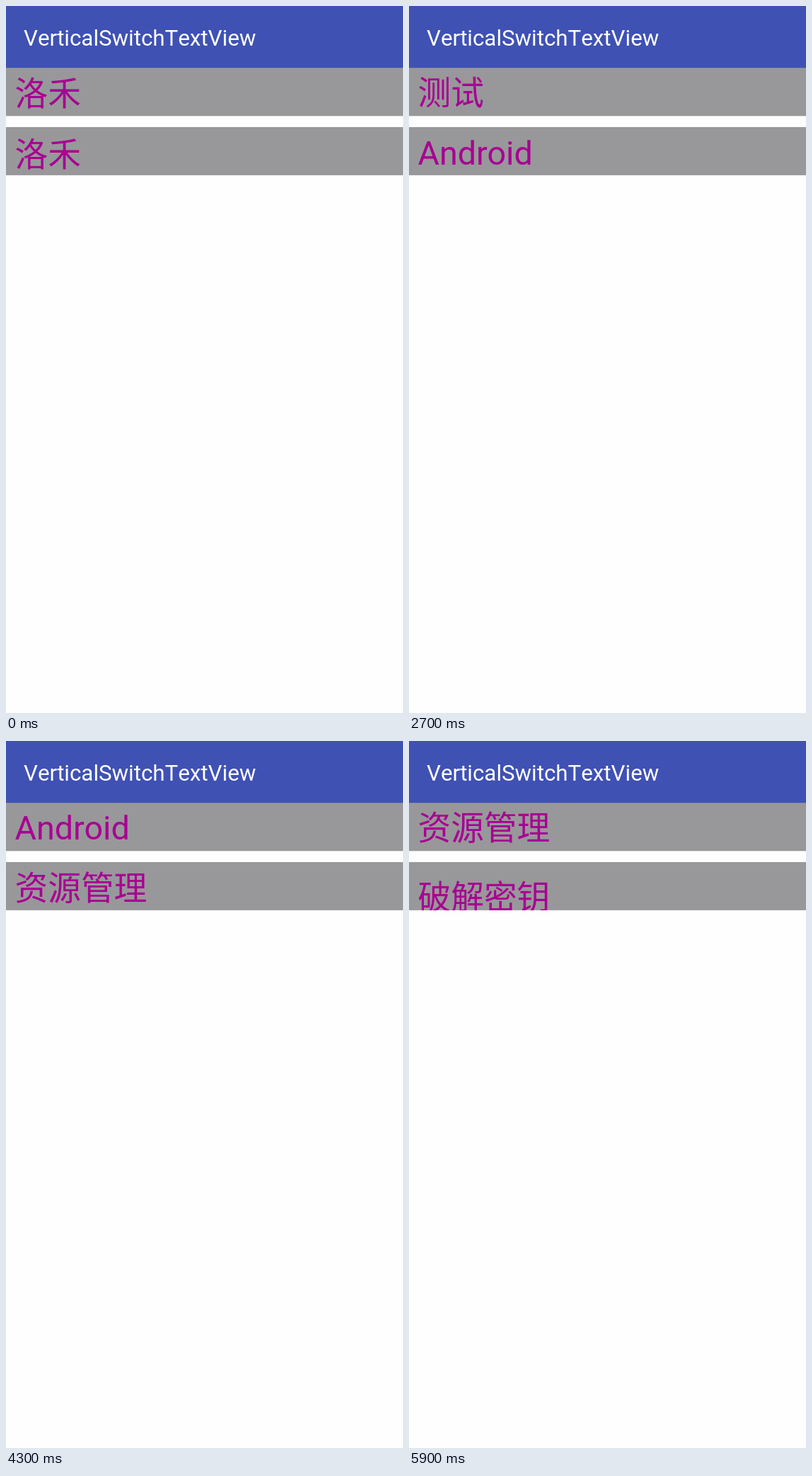
An HTML page for the animation above (6000 ms loop, 561x998 px).

```html
<!DOCTYPE html>
<html lang="zh-CN">
<head>
<meta charset="utf-8">
<title>VerticalSwitchTextView</title>
<style>
  html, body { margin: 0; width: 100%; height: 100%; overflow: hidden; background: #fefefe; }
  svg { display: block; }
  text { font-family: Roboto, "Noto Sans CJK SC", "Noto Sans CJK", sans-serif; }
  .title { font-size: 31.3px; font-kerning: none; fill: #fff; }
  .bar { fill: #98989a; }
  .row text { font-size: 46.7px; fill: #a80092; }
</style>
</head>
<body>
<svg width="561" height="998">
  <rect width="561" height="88" fill="#3f51b3"/>
  <text class="title" x="25" y="56">VerticalSwitchTextView</text>
  <rect class="bar" y="87.3" width="561" height="68"/>
  <svg class="row" y="87.3" width="561" height="68"><text x="12.5"></text></svg>
  <rect class="bar" y="170.9" width="561" height="68"/>
  <svg class="row" y="170.9" width="561" height="68"><text x="12.5"></text></svg>
</svg>
<script>
const LOOP = 6000, STEP = 100, HEIGHT = 68, BASELINE = 53;
const words = ["洛禾", "测试", "Android", "资源管理", "破解密钥"];
const labels = document.querySelectorAll(".row text");

// direction: -1 scrolls up, 1 scrolls down; starts: when each switch begins
const rows = [
  { label: labels[0], direction: -1, duration: 400, starts: [1075, 2675, 4275, 5875] },
  { label: labels[1], direction: 1, duration: 600, starts: [-46, 1438, 2899, 4360, 5780] }
];

const ease = p => 0.5 - Math.cos(Math.PI * p) / 2;

// The old word leaves completely before the next one enters from the other side.
function drawRow({ label, direction, duration, starts }, time) {
  const begun = starts.filter(start => start <= time).length;
  let index = begun, offset = 0;
  if (begun) {
    const progress = ease(Math.min(1, (time - starts[begun - 1]) / duration));
    const leaving = progress < 0.5;
    if (leaving) index--;
    offset = 2 * HEIGHT * direction * (leaving ? progress : progress - 1);
  }
  label.textContent = words[index % words.length];
  label.setAttribute("y", BASELINE + offset);
}

const origin = performance.now();
function frame() {
  const elapsed = (performance.now() - origin) % LOOP;
  const time = Math.floor(elapsed / STEP) * STEP;
  rows.forEach(row => drawRow(row, time));
  requestAnimationFrame(frame);
}
frame();
</script>
</body>
</html>
```
